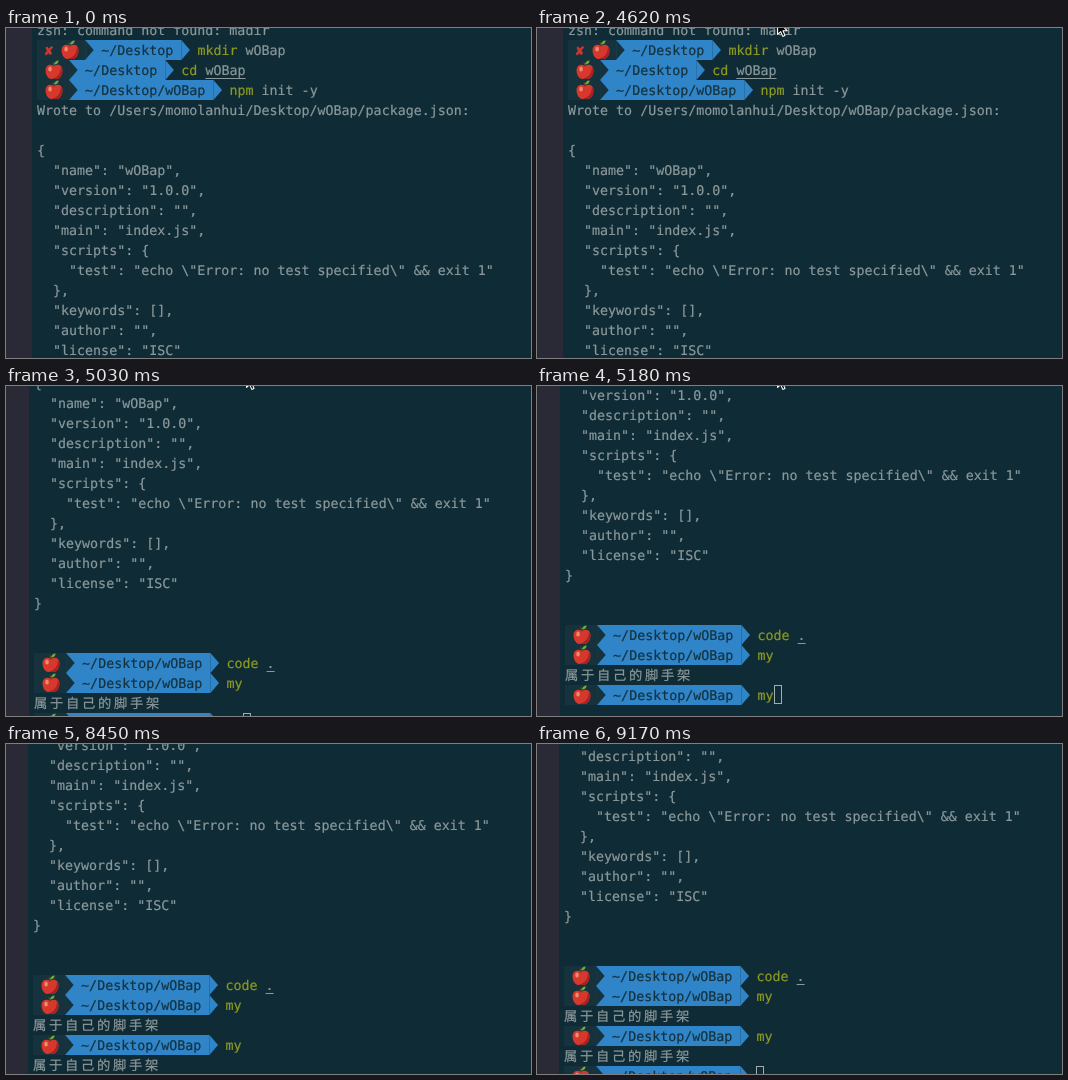
An HTML page that plays this animation: 525x330 px, repeating every 9920 ms.

```html
<!DOCTYPE html>
<html lang="en">
<head>
<meta charset="utf-8">
<title>Terminal</title>
<style>
  html, body { margin: 0; width: 100%; height: 100%; overflow: hidden; background: #0f2b35; }
  svg { display: block; width: 525px; height: 330px; }
  text {
    font: 13.32px "DejaVu Sans Mono", "Liberation Mono", monospace;
    text-rendering: geometricPrecision; white-space: pre;
    fill: #8b999b; stroke: #8b999b; stroke-width: 0.2px;
  }
  .path { fill: #15323d; stroke: #15323d; }
  .cmd { fill: #8d9a22; stroke: #8d9a22; }
  .fail { fill: #d2382f; stroke: #d2382f; stroke-width: 0.6px; }
  .cjk { font: 13.3px "Noto Sans CJK SC", "Noto Sans CJK", sans-serif; letter-spacing: 2.7px; }
</style>
</head>
<body>
<svg viewBox="0 0 525 330">
  <defs>
    <g id="apple">
      <path fill="#d6382d" d="M0-4C-3-6.3-8.5-5.5-8.5 0.5C-8.5 5-5.5 9-3 9C-1.5 9-1 8.4 0 8.4S1.5 9 3 9C5.5 9 8.5 5 8.5 0.5C8.5-5.5 3-6.3 0-4Z"/>
      <path fill="#a8201f" d="M6.8-3.6C9 0 8.6 5 4.5 8.6C2 9.4 1 8.2-1 8.5C4 6.5 7 3 6.8-3.6Z"/>
      <ellipse cx="-4" cy="-1" rx="1.8" ry="2.6" fill="#f08a70"/>
      <path fill="none" stroke="#6b4524" stroke-width="1.3" d="M0-3.5Q0-6 -1.2-7.5"/>
      <path fill="#6fae38" d="M0-5.5Q0.3-9.3 4.6-9.6Q4.3-5.8 0-5.5Z"/>
    </g>
  </defs>
  <rect width="525" height="330" fill="#0f2b35"/>
  <rect id="side" height="330" fill="#2a2a36"/>
  <g id="page"></g>
  <path id="beam" fill="none" stroke="#e8eced" stroke-width="1.2"
        d="M-3-6.9Q0-6.9 0-4.8V4.8Q0 6.9-3 6.9M3-6.9Q0-6.9 0-4.8M0 4.8Q0 6.9 3 6.9"/>
  <path id="arrow" fill="#000" stroke="#fff" stroke-width="1.1" stroke-linejoin="round"
        d="M0.6 1V14.4L3.7 11.6L5.8 16.4L8 15.5L6 10.8H10.3Z"/>
</svg>
<script>
const LOOP = 9920, CELL = 8.02, LINE = 20;
const $ = id => document.getElementById(id);
const esc = s => s.replace(/&/g, "&amp;");

// Coordinates inside the page: column 0 is x = 0, y is the middle of a row.
const text = (col, y, s, cls = "") =>
  `<text class="${cls}" x="${col * CELL}" y="${y + 5}">${esc(s)}</text>`;

const wedge = (col, y, fill) => {
  const x = col * CELL;
  return `<path fill="${fill}" d="M${x} ${y - 10}l8.6 10l-8.6 10z"/>`;
};

const band = (from, to, y, fill) =>
  `<rect x="${from * CELL}" y="${y - 10}" width="${(to - from) * CELL}" height="${LINE}" fill="${fill}"/>`;

function prompt(y, dir, cmd = "", arg = "", underline = false, failed = false) {
  const start = failed ? 6 : 4;
  const end = start + dir.length + 3;
  const argCol = end + 2 + cmd.length + 1;
  const line = underline
    ? `<rect x="${argCol * CELL}" y="${y + 8}" width="${arg.length * CELL}" height="1" fill="#8b999b"/>` : "";
  return band(0, start, y, "#15323d") + band(start, end, y, "#3085c9") +
    wedge(start, y, "#15323d") + wedge(end, y, "#3085c9") +
    (failed ? text(1, y, "✘", "fail") : "") +
    `<use href="#apple" x="${(start - 2) * CELL + 1}" y="${y}"/>` +
    text(start + 2, y, dir, "path") + text(end + 2, y, cmd, "cmd") +
    text(argCol, y, arg) + line;
}

const home = "~/Desktop", dir = home + "/wOBap", reply = "属于自己的脚手架";
const json = [
  "Wrote to /Users/momolanhui/Desktop/wOBap/package.json:",
  "",
  "{",
  '  "name": "wOBap",',
  '  "version": "1.0.0",',
  '  "description": "",',
  '  "main": "index.js",',
  '  "scripts": {',
  '    "test": "echo \\"Error: no test specified\\" && exit 1"',
  "  },",
  '  "keywords": [],',
  '  "author": "",',
  '  "license": "ISC"',
  "}"
];

$("page").innerHTML =
  text(0, 2, "zsh: command not found: madir") +
  prompt(22, home, "mkdir", "wOBap", false, true) +
  prompt(42, home, "cd", "wOBap", true) +
  prompt(62, dir, "npm", "init -y") +
  json.map((s, i) => text(0, 82 + i * LINE, s)).join("") +
  prompt(402, dir, "code", ".", true) +
  prompt(422, dir, "my") +
  text(0, 442, reply, "cjk") +
  prompt(462, dir, "my") +
  `<g id="answer">${text(0, 482, reply, "cjk")}${prompt(502, dir)}</g>` +
  `<rect id="caret" width="7" height="18" stroke="#a3adae"/>`;

// Each step: start time, then values held until the next step.
const scroll = [[0, 31, 0], [4910, 28, -73], [5030, 28, -125], [5180, 28, -153],
  [8450, 27, -161], [8580, 27, -167], [8730, 27, -170]];
const pointer = [[0], [3590, "beam", 322, 280], [3890, "beam", 278, 146],
  [4030, "beam", 245, 103], [4180, "beam", 246, 43], [4330, "beam", 242, 20],
  [4480, "beam", 246, 5], [4620, "arrow", 240, -8], [4770, "arrow", 240, -13],
  [5780, "arrow", 252, 50], [5930, "arrow", 336, 288], [6070],
  [9020, "arrow", 239, 13], [9170]];
const caret = [[0, 26, 462, "none"], [6370, 26, 462, "#a3adae"],
  [6970, 0, 482, "#a3adae"], [7120, 24, 502, "none"]];

const at = (steps, t) => steps.findLast(s => s[0] <= t);
const move = (el, x, y) => el.setAttribute("transform", `translate(${x} ${y})`);

function draw(now) {
  const t = now % LOOP;
  const [, x, y] = at(scroll, t);
  move($("page"), x, y);
  $("side").setAttribute("width", x - 5);
  $("answer").style.display = t < 7120 ? "none" : "";

  const [, col, row, fill] = at(caret, t);
  move($("caret"), Math.round(col * CELL) + 0.5, row - 9.5);
  $("caret").setAttribute("fill", fill);

  const [, kind, px, py] = at(pointer, t);
  for (const id of ["beam", "arrow"]) $(id).style.display = id === kind ? "" : "none";
  if (kind) move($(kind), px, py);
  requestAnimationFrame(draw);
}
draw(0);
</script>
</body>
</html>
```
